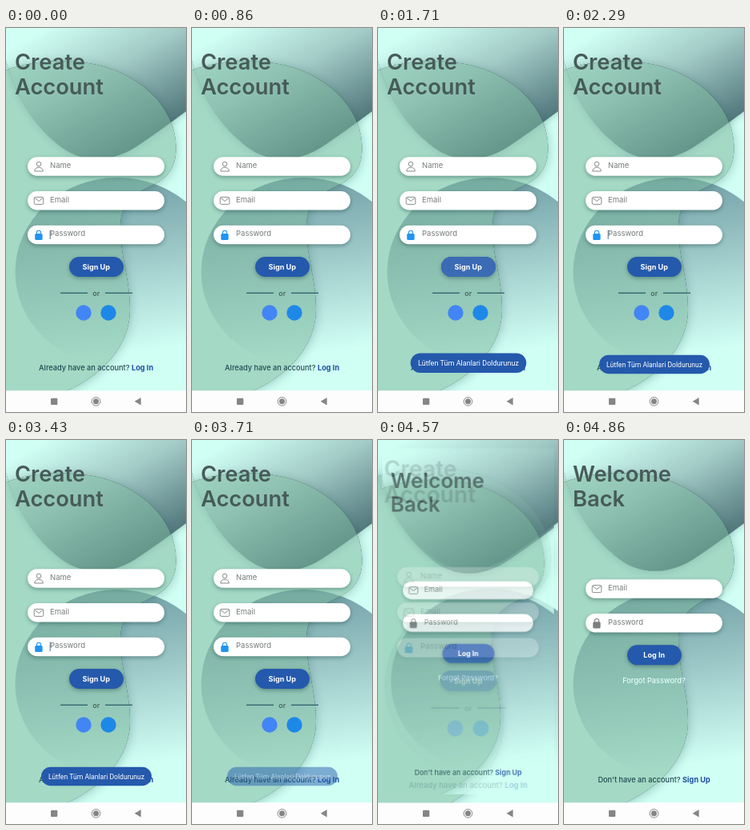
These frames come from a looping animation (225x480 px, 5.01 s). An HTML page with a canvas:

```html
<!DOCTYPE html>
<html lang="en">
<head>
<meta charset="utf-8">
<title>Create Account</title>
<style>
html, body { margin: 0; width: 100%; height: 100%; overflow: hidden; background: #d0fff4; }
canvas { display: block; width: 225px; height: 480px; }
</style>
</head>
<body>
<canvas id="stage"></canvas>
<script>
const W = 225, H = 480, APP_H = 453.5, LOOP = 5010;
const SANS = 'Inter, "Open Sans", sans-serif';
const BLUE = '#2459ac', INK = '#465b58', GREY = '#7c7f80';
const dpr = window.devicePixelRatio || 1;

function prepare(canvas) {
  canvas.width = Math.round(W * dpr);
  canvas.height = Math.round(H * dpr);
  const c = canvas.getContext('2d');
  c.scale(dpr, dpr);
  return c;
}

const clamp = v => Math.min(1, Math.max(0, v));
const ramp = (t, from, to) => clamp((t - from) / (to - from));
const easeOut = p => 1 - (1 - p) ** 3;

function shadow(c, color, blur, dy) {
  c.shadowColor = color;
  c.shadowBlur = blur * dpr;
  c.shadowOffsetY = dy * dpr;
}

function pill(c, x, y, w, h, fill) {
  c.beginPath();
  c.roundRect(x, y, w, h, h / 2);
  c.fillStyle = fill;
  c.fill();
}

function raisedPill(c, x, y, w, h, fill) {
  c.save();
  shadow(c, 'rgba(20,60,60,.4)', 5, 2);
  pill(c, x, y, w, h, fill);
  c.restore();
}

function text(c, str, x, y, size, weight, color, align = 'left', family = SANS) {
  c.font = `${weight} ${size}px ${family}`;
  c.textAlign = align;
  c.fillStyle = color;
  c.fillText(str, x, y);
}

function disc(c, x, y, r, color) {
  c.beginPath();
  c.arc(x, y, r, 0, Math.PI * 2);
  c.fillStyle = color;
  c.fill();
}

function gradient(c, x0, y0, x1, y1, ...stops) {
  const g = c.createLinearGradient(x0, y0, x1, y1);
  stops.forEach(([at, color]) => g.addColorStop(at, color));
  return g;
}

// shadow falls only outside the path, so translucent fills stay clean
function outerShadow(c, path, color, blur) {
  const outside = new Path2D();
  outside.rect(-100, -100, W + 200, H + 200);
  outside.addPath(path);
  c.save();
  c.clip(outside, 'evenodd');
  shadow(c, color, blur, 2);
  c.fillStyle = '#000';
  c.fill(path);
  c.restore();
}

function upperDrop() {
  const p = new Path2D();
  p.moveTo(-10, -20);
  p.bezierCurveTo(-4, 60, 25, 112, 62, 143);
  p.bezierCurveTo(92, 170, 128, 169, 160, 150);
  p.quadraticCurveTo(195, 127, 250, 85);
  p.lineTo(250, -20);
  p.closePath();
  return p;
}

function greenBlob() {
  const p = new Path2D();
  p.moveTo(-20, 62);
  p.bezierCurveTo(22, 38, 88, 35, 134, 52);
  p.bezierCurveTo(180, 70, 212.5, 106, 212.5, 150);
  p.bezierCurveTo(212.5, 178, 198, 190, 178, 199);
  p.bezierCurveTo(153, 211, 143, 224, 143, 250);
  p.bezierCurveTo(143, 287, 155, 312, 155, 352);
  p.bezierCurveTo(155, 396, 121, 436, 70, 456);
  p.lineTo(-20, 490);
  p.closePath();
  return p;
}

function backdrop(c) {
  c.fillStyle = '#d0fff4';
  c.fillRect(0, 0, W, APP_H);
  c.save();
  c.beginPath();
  c.rect(0, 0, W, APP_H);
  c.clip();

  const drop = upperDrop(), blob = greenBlob();
  outerShadow(c, drop, 'rgba(30,80,80,.25)', 9);
  c.fillStyle = gradient(c, 95, -25, 185, 135,
    [0, '#d0fff4'], [.45, '#a3cbc7'], [1, '#4d7378']);
  c.fill(drop);

  c.beginPath();
  c.ellipse(139.5, 305, 128, 118, 0, 0, Math.PI * 2);
  c.fillStyle = gradient(c, 150, 187, 178, 403,
    [0, '#71a0a6'], [.45, '#9dc8c8'], [1, '#d0fff4']);
  c.fill();

  outerShadow(c, blob, 'rgba(30,80,80,.32)', 13);
  c.fillStyle = 'rgba(123,183,157,.53)';
  c.fill(blob);
  c.restore();
}

function navBar(c) {
  c.fillStyle = '#fdfdfd';
  c.fillRect(0, APP_H, W, H - APP_H);
  const tone = '#858585';
  c.fillStyle = tone;
  c.beginPath();
  c.roundRect(56, 462.7, 8.3, 8.3, 1);
  c.fill();
  disc(c, 112.5, 466.8, 3.5, tone);
  c.beginPath();
  c.arc(112.5, 466.8, 5.3, 0, Math.PI * 2);
  c.lineWidth = 1;
  c.strokeStyle = tone;
  c.stroke();
  c.beginPath();
  c.moveTo(160.7, 466.8);
  c.lineTo(168.7, 462);
  c.lineTo(168.7, 471.6);
  c.closePath();
  c.fillStyle = tone;
  c.fill();
}

// icons are centred on (41, y)
const icons = {
  person(c, y) {
    c.beginPath();
    c.arc(41, y - 3, 2.8, 0, Math.PI * 2);
    c.moveTo(35.7, y + 6);
    c.bezierCurveTo(35.7, y - .4, 46.3, y - .4, 46.3, y + 6);
    c.closePath();
    c.stroke();
  },
  mail(c, y) {
    c.beginPath();
    c.roundRect(35.2, y - 4.3, 11.6, 9, 1.5);
    c.moveTo(36, y - 3.2);
    c.lineTo(41, y + .8);
    c.lineTo(46, y - 3.2);
    c.stroke();
  },
  lock(c, y, color) {
    c.lineWidth = 1.1;
    c.beginPath();
    c.moveTo(38.4, y);
    c.lineTo(38.4, y - 2.6);
    c.arc(41, y - 2.6, 2.6, Math.PI, 0);
    c.lineTo(43.6, y);
    c.stroke();
    c.fillStyle = color;
    c.beginPath();
    c.roundRect(36.2, y - 1.5, 9.4, 8.2, 1.6);
    c.fill();
  }
};

function field(c, y, label, icon, color = GREY) {
  raisedPill(c, 27, y, 171, 23.5, '#fff');
  c.lineWidth = .9;
  c.lineJoin = 'round';
  c.strokeStyle = color;
  icons[icon](c, y + 11.7, color);
  text(c, label, 55, y + 13.7, 9.5, 400, '#777b7b');
}

function heading(c, first, second) {
  text(c, first, 11, 52, 27.3, 600, INK);
  text(c, second, 11, 83, 27.3, 600, INK);
}

function buttonLabel(c, y, label) {
  text(c, label, 112.7, y + 16, 9.1, 700, '#fff', 'center');
}

function button(c, y, label) {
  raisedPill(c, 79, y, 68, 25, BLUE);
  buttonLabel(c, y, label);
}

function footer(c, question, link) {
  c.font = `500 9.2px ${SANS}`;
  const lead = c.measureText(question + ' ').width;
  c.font = `700 9.2px ${SANS}`;
  const x = 112.6 - (lead + c.measureText(link).width) / 2;
  text(c, question, x, 428, 9.2, 500, '#20494f');
  text(c, link, x + lead, 428, 9.2, 700, '#1d4ea3');
}

function signUpPage(c) {
  backdrop(c);
  heading(c, 'Create', 'Account');
  field(c, 161.3, 'Name', 'person');
  field(c, 204, 'Email', 'mail');
  field(c, 246.7, 'Password', 'lock', '#2094f0');
  button(c, 286, 'Sign Up');
  c.fillStyle = '#32676f';
  c.fillRect(68, 330.6, 34, 1.4);
  c.fillRect(124, 330.6, 34, 1.4);
  text(c, 'or', 112.7, 334.8, 9, 500, INK, 'center');
  disc(c, 97, 356, 9.7, '#4285f4');
  disc(c, 128, 356, 9.7, '#1e88e8');
  footer(c, 'Already have an account?', 'Log In');
}

function logInPage(c) {
  backdrop(c);
  heading(c, 'Welcome', 'Back');
  field(c, 174.2, 'Email', 'mail');
  field(c, 217, 'Password', 'lock');
  button(c, 256.3, 'Log In');
  text(c, 'Forgot Password?', 112.5, 304.3, 9.2, 500, '#e4fff8', 'center');
  footer(c, "Don't have an account?", 'Sign Up');
}

function cached(paint) {
  const canvas = document.createElement('canvas');
  paint(prepare(canvas));
  return canvas;
}

const ctx = prepare(document.getElementById('stage'));
const signUp = cached(signUpPage), logIn = cached(logInPage);

function drawPage(page, scale, alpha) {
  ctx.save();
  ctx.globalAlpha = alpha;
  ctx.translate(W / 2, APP_H / 2);
  ctx.scale(scale, scale);
  ctx.translate(-W / 2, -APP_H / 2);
  ctx.beginPath();
  ctx.rect(0, 0, W, APP_H);
  ctx.clip();
  ctx.drawImage(page, 0, 0, W, H);
  ctx.restore();
}

function pressedButton(t) {
  const press = ramp(t, 1500, 1600) * (1 - ramp(t, 1800, 2050));
  if (!press) return;
  pill(ctx, 79, 286, 68, 25, BLUE);
  pill(ctx, 79, 286, 68, 25, `rgba(255,255,255,${.11 * press})`);
  buttonLabel(ctx, 286, 'Sign Up');
}

function cursor(t) {
  if ((t + 30) % 1000 >= 500) return;
  ctx.fillStyle = '#3b6280';
  ctx.fillRect(54.7, 252.7, .9, 11.3);
}

function toast(t) {
  const alpha = ramp(t, 1580, 1670) * (1 - ramp(t, 3620, 3800));
  if (!alpha) return;
  const grow = easeOut(ramp(t, 1580, 1700));
  const settle = easeOut(ramp(t, 1710, 1950));
  const scale = .85 + .2 * grow - .05 * settle;
  ctx.save();
  ctx.globalAlpha = alpha;
  ctx.translate(113, 418.7 + 1.8 * settle);
  ctx.scale(scale, scale);
  pill(ctx, -69, -11.7, 138, 23.4, BLUE);
  text(ctx, 'Lütfen Tüm Alanlari Doldurunuz', 0, 3.1, 8.6, 400, '#fff', 'center', 'Roboto, sans-serif');
  ctx.restore();
}

function render(t) {
  const move = ramp(t, 4470, 4780);
  const p = easeOut(move);
  if (move < 1) drawPage(signUp, 1 + .05 * p, 1);
  if (move === 0) {
    pressedButton(t);
    cursor(t);
    toast(t);
  } else {
    drawPage(logIn, .85 + .15 * p, ramp(move, .1, .4));
  }
  navBar(ctx);
}

const start = performance.now();
function tick() {
  render((performance.now() - start) % LOOP);
  requestAnimationFrame(tick);
}
tick();
</script>
</body>
</html>
```
